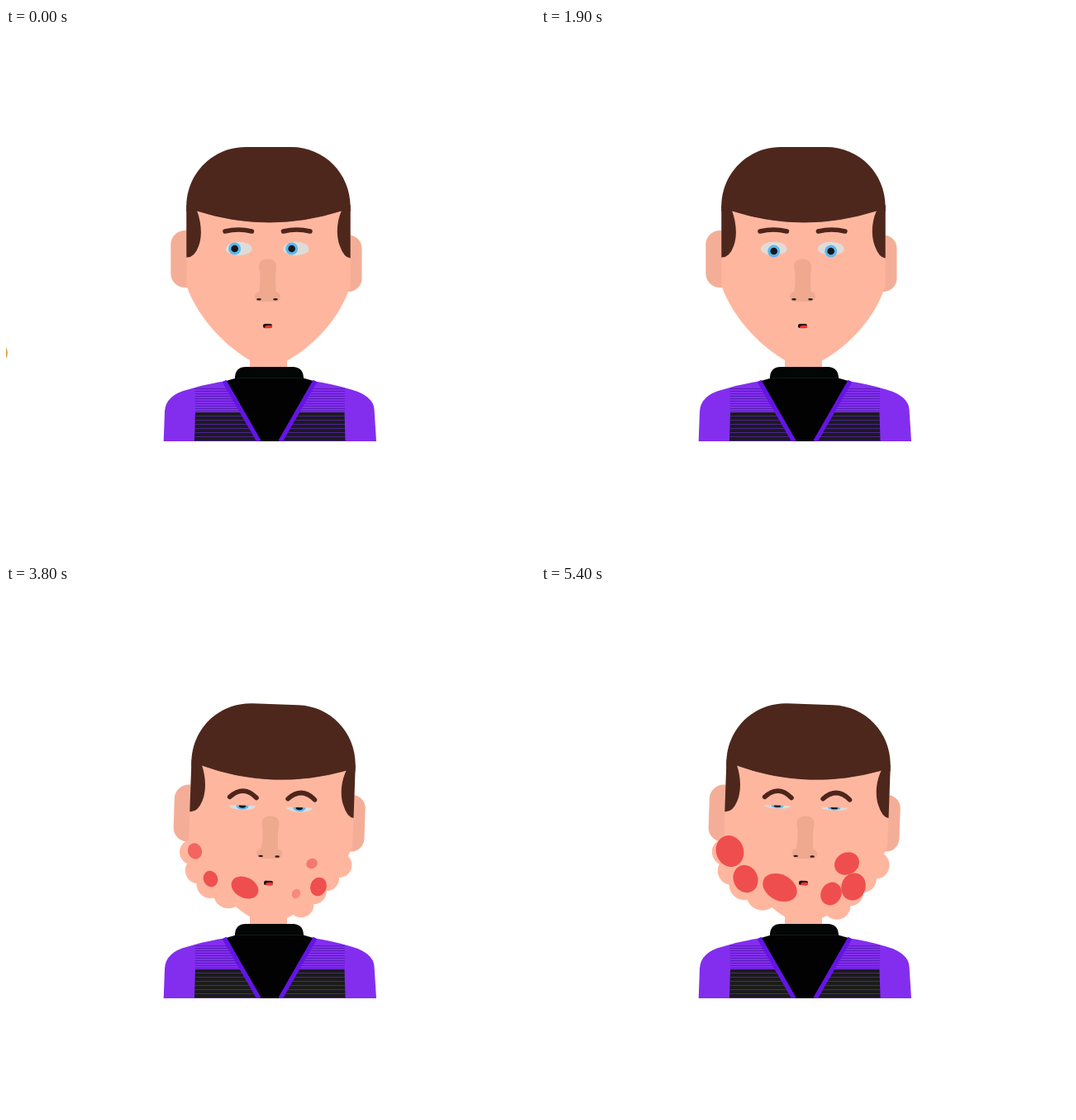
These frames come from a looping animation (640x640 px, 5500 ms). An HTML page:

```html
<!DOCTYPE html>
<html lang="en">
<head>
<meta charset="utf-8">
<title>Allergic reaction</title>
<style>
  html, body { margin: 0; width: 100%; height: 100%; overflow: hidden; background: #fff; }
  svg { display: block; width: 100%; height: 100%; }
</style>
</head>
<body>
<svg viewBox="0 0 640 640">
  <defs>
    <clipPath id="lid"><rect id="lidRect" x="-25" width="50" height="60"/></clipPath>
    <clipPath id="lips"><rect x="-25.3" y="-13.5" width="50.6" height="27" rx="13"/></clipPath>
    <g id="eye" clip-path="url(#lid)">
      <g class="ball">
        <ellipse rx="15.8" ry="8.3" fill="#dedcd9"/>
        <g class="iris">
          <circle r="7.5" fill="#5cb8ec"/>
          <circle r="4.3" fill="#17171c"/>
        </g>
      </g>
    </g>
  </defs>

  <rect x="295" y="385" width="45" height="32" fill="#ffb69f"/>

  <g id="head">
    <g fill="#f4ae98">
      <rect x="199.3" y="245" width="38" height="69" rx="17"/>
      <rect x="392.5" y="250.5" width="38" height="68.5" rx="16"/>
    </g>
    <path fill="#ffb69f" d="M218.500 220V312C230 346 262 384 297 403Q318 410 339 403C374 384 405 349 416.500 312V220Z"/>
    <g fill="#4e271c">
      <path d="M218.300 222V216C218.300 176 250 144 290 144H345C385 144 416.700 176 416.700 216V222L406 221Q318 249 231 221Z"/>
      <path d="M218.300 214L231 221C236 234 238 251 233 264Q228 278 218.300 277.500Z"/>
      <path d="M416.700 214L406 221C400 234 399 252 404 264Q409 278 416.700 278.500Z"/>
    </g>
    <path fill="none" stroke="#3f2018" stroke-width=".8" d="M231 221Q318 249 406 221"/>
    <g fill="none" stroke="#4e251b" stroke-width="5.6" stroke-linecap="round">
      <path class="brow"/><path class="brow" transform="translate(70.5)"/>
    </g>
    <g id="eyes"></g>
    <g fill="#eea98f">
      <path d="M306 289Q306 279.500 316.500 279.500Q327 279.500 327 289Q325 302 327 322H306Q309 302 306 289Z"/>
      <rect x="301" y="319" width="31" height="12" rx="6"/>
    </g>
    <g fill="#2c1c1a">
      <ellipse cx="306" cy="328.2" rx="2.8" ry="1.2"/>
      <ellipse cx="326" cy="328.2" rx="2.8" ry="1.2"/>
    </g>
    <g id="mouth">
      <g clip-path="url(#lips)">
        <rect x="-26" y="-14" width="52" height="28" fill="#151515"/>
        <path fill="#f5322f" d="M-17 14Q-16 -3.500 2 -3.500H26V14Z"/>
      </g>
    </g>
  </g>

  <g id="bumps" fill="#ffb69f"></g>
  <g id="spots" fill="#ef4e4e"></g>

  <path fill="#832eee" d="M190.700 500L192 464Q193 444 220 437.500Q242 430.500 267 427H371Q395 430.500 418 437.500Q444 445 445.500 461L448 500Z"/>
  <path fill="#1b1b1b" d="M229 465H409.500L410.500 500H228Z"/>
  <g id="stripes"></g>
  <path fill="#020202" d="M266 427L280 423H358L372 427L330 500H308Z"/>
  <path fill="none" stroke="#6415e4" stroke-width="5.5" d="M264 427L306 500M374 427L332 500"/>
  <path fill="#fff" d="M180 500H460V520H180Z"/>
  <path fill="#020605" d="M277 424V422Q278 410 290 410H348Q360 411 360 424Z"/>
  <path stroke="#141a19" d="M278 423.500H359"/>
  <circle id="snack" r="12.5" fill="#dca24a"/>
</svg>
<script>
const LOOP = 5500, STEP = 100;
const $ = id => document.getElementById(id);
const all = selector => document.querySelectorAll(selector);
const mix = (a, b, k) => a + (b - a) * k;
const ramp = (t, a, b) => Math.min(1, Math.max(0, (t - a) / (b - a)));

function set(el, attrs) {
  for (const key in attrs) el.setAttribute(key, attrs[key]);
  return el;
}
function add(parent, tag, attrs = {}) {
  const el = document.createElementNS('http://www.w3.org/2000/svg', tag);
  return parent.appendChild(set(el, attrs));
}

for (const x of [281.7, 350.7]) {
  const eye = $('eye').cloneNode(true);
  eye.removeAttribute('id');
  add($('eyes'), 'g', { transform: `translate(${x} 267)` }).append(eye);
}

function stripes(top, bottom, gap, color) {
  for (let y = top; y < bottom; y += gap)
    add($('stripes'), 'path', { d: `M228.500 ${y}H410`, stroke: color });
}
stripes(436.5, 464, 3, '#5a1cba');
stripes(469.5, 500, 5, '#4c2294');

// Swellings follow each side of the jaw, from ear to chin.
const bumps = [];
for (let i = 0; i < 4; i++) {
  bumps.push({ x: 223 + i * (4.5 + 3.5 * i), y: 323 + i * (25.5 - 2.8 * i), r: 16.2 + 1.1 * i });
  bumps.push({ x: 405 - 15.7 * i, y: 339 + 16.4 * i, r: 16.6 });
}
for (const bump of bumps) bump.el = add($('bumps'), 'circle');

// Rash, fastest growing first: x, y, radius, angle
const spots = [
  [289, 366, 15.6, -63],
  [378, 365, 14.5, 20],
  [247.5, 355.5, 14.7, -22],
  [228.5, 322, 16.6, -20],
  [370, 337, 13.3, 62],
  [351, 373.5, 12.3, 28]
].map(([x, y, r, angle], i) => ({
  r, i, el: add($('spots'), 'ellipse', { transform: `translate(${x} ${y}) rotate(${angle})` })
}));

function drawSnack(t) {
  const u = ramp(t, 0, 750);
  const x = mix(-10.5, 317, u);
  const y = mix(393, 360, u) - 424 * u * (1 - u);
  set($('snack'), { transform: `translate(${x} ${y}) scale(${1 - ramp(t, 750, 850)})` });
}

function drawFace(t) {
  const sick = ramp(t, 2200, 3000);
  set($('head'), { transform: `rotate(${2 * sick ** 1.5} 317 390)` });

  const open = t < 1200 ? t / 1200 : 1 - ramp(t, 1200, 1800);
  set($('mouth'), {
    transform: `translate(316.5 360.5) scale(${mix(.22, 1, open)} ${mix(.21, 1, open)})`
  });

  const look = ramp(t, 0, 1200);
  const blink = 1 - .92 * Math.sin(Math.PI * ramp(t, 1200, 1900));
  const squint = mix(mix(1, .72, sick), .4, ramp(t, 3000, 5400));
  set($('eyes'), { transform: `translate(0 ${1.3 * sick})` });
  set($('lidRect'), { y: mix(-9, -.5, sick) });
  for (const ball of all('#eyes .ball')) set(ball, { transform: `scale(1 ${blink * squint})` });
  for (const iris of all('#eyes .iris'))
    set(iris, { transform: `translate(${mix(-5, 0, look)} ${3 * look * (1 - sick)})` });

  const brow = `M${mix(265, 266, sick)} ${mix(246, 258, sick)}q16.200 ${mix(-4, -15.5, sick)} 32.400 0`;
  for (const el of all('.brow')) set(el, { d: brow });
}

function drawReaction(t) {
  // Bumps push outwards from the middle of the face while they swell.
  const inward = (ramp(-t, -5400, -2700) * 2700 / 2400) ** 3;
  const appear = ramp(t, 2400, 2800);
  for (const { x, y, r, el } of bumps) set(el, {
    cx: mix(x, 317, .07 * inward),
    cy: mix(y, 330, .07 * inward),
    r: r * appear * (1 - .27 * inward)
  });

  const left = 1 - ramp(t, 2700, 5400);
  for (const { r, i, el } of spots) {
    const size = 1 - left ** (3 / (1 + .4 * i));
    set(el, {
      rx: r * size,
      ry: r * size * (i ? 1.16 : 1.4),
      opacity: Math.min(1, size * (1.8 - .03 * i * i))
    });
  }
}

const start = performance.now();
function frame() {
  const elapsed = Math.max(0, performance.now() - start) % LOOP;
  const t = Math.floor(elapsed / STEP) * STEP;
  drawSnack(t);
  drawFace(t);
  drawReaction(t);
  requestAnimationFrame(frame);
}
frame();
</script>
</body>
</html>
```
